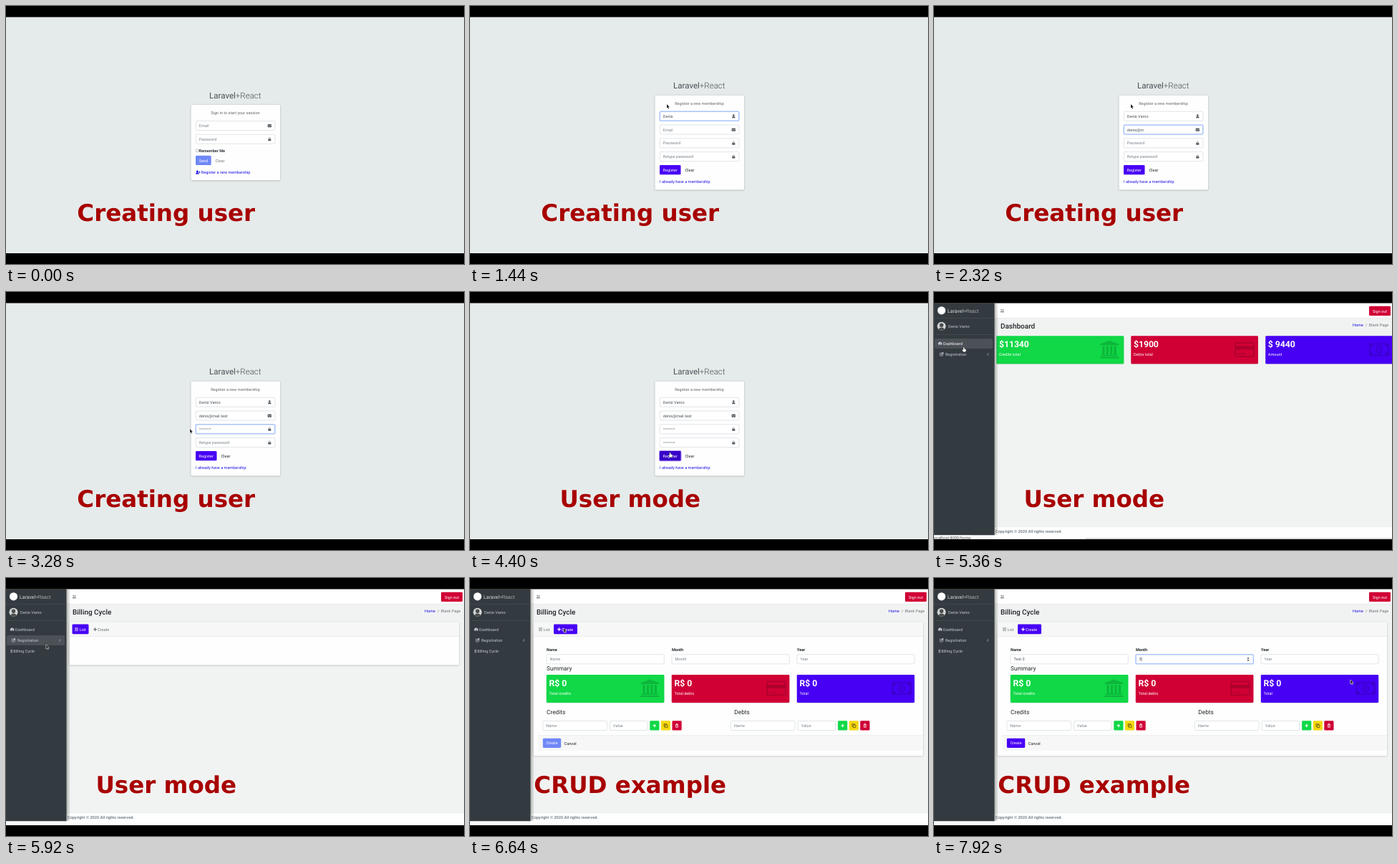
An HTML page with a canvas for the animation above (8 s loop, 640 by 360 pixels).

```html
<!DOCTYPE html>
<html lang="en">
<head>
<meta charset="utf-8">
<title>Laravel+React</title>
<style>
  html, body { margin: 0; width: 100%; height: 100%; overflow: hidden; background: #000; }
  canvas { display: block; width: 640px; height: 360px; }
</style>
</head>
<body>
<canvas id="stage"></canvas>
<script>
const LOOP = 8000, STEP = 80, REM = 5.55;
const GREEN = '#10d846', RED = '#d00035', BLUE = '#4700f4', YELLOW = '#f5d810';
const LINK = '#1a0ee6', DARK = '#212529', GREY = '#6c757d', BORDER = '#ced4da';
const FADED = 'rgba(0,0,0,.16)', MENU = '#c2c7d0', DISABLED = '#6f88f8';
const FULL_NAME = 'Denis Varno', EMAIL = 'denis@mail.test', DOTS = '•'.repeat(9);

const canvas = document.getElementById('stage');
const ctx = canvas.getContext('2d');
const dpr = window.devicePixelRatio || 1;
canvas.width = 640 * dpr;
canvas.height = 360 * dpr;

// time, x, y, hand shape from here on
const PATH = [
  [80, 300, 264, 0], [400, 290, 231, 1], [640, 290, 231, 0], [800, 275, 152, 0],
  [880, 275, 152, 0], [1040, 275, 137, 0], [3040, 275, 137, 0], [3200, 246, 172, 0],
  [3280, 257, 191, 0], [3360, 257, 191, 0], [3520, 285, 208, 0], [4000, 285, 208, 0],
  [4240, 279, 224, 1], [4640, 279, 224, 0], [5280, 41, 77, 1], [5440, 41, 77, 1],
  [5520, 40, 86, 1], [5680, 30, 101, 1], [5840, 30, 101, 0], [6080, 131, 70, 1],
  [6640, 131, 70, 0], [6960, 160, 112, 0], [7120, 160, 112, 0], [7360, 582, 142, 0]
];

function rect(x, y, w, h, fill, r = 0) {
  ctx.fillStyle = fill;
  ctx.beginPath();
  ctx.roundRect(x, y, w, h, r);
  ctx.fill();
}

function frame(x, y, w, h, color, r = 1.2, line = 0.6) {
  ctx.strokeStyle = color;
  ctx.lineWidth = line;
  ctx.beginPath();
  ctx.roundRect(x, y, w, h, r);
  ctx.stroke();
}

function disc(x, y, r, fill) {
  ctx.fillStyle = fill;
  ctx.beginPath();
  ctx.arc(x, y, r, 0, 7);
  ctx.fill();
}

function poly(points, fill) {
  ctx.fillStyle = fill;
  ctx.beginPath();
  points.forEach(([x, y]) => ctx.lineTo(x, y));
  ctx.closePath();
  ctx.fill();
}

function line(points, color, width) {
  ctx.strokeStyle = color;
  ctx.lineWidth = width;
  ctx.beginPath();
  points.forEach(([x, y]) => ctx.lineTo(x, y));
  ctx.stroke();
}

function text(s, x, y, color = DARK, size = REM, weight = 400, align = 'left') {
  ctx.font = `${weight} ${size}px Roboto, sans-serif`;
  ctx.textAlign = align;
  ctx.fillStyle = color;
  ctx.fillText(s, x, y);
  return x + ctx.measureText(s).width;
}

function panel(x, y, w, h, r = 1.4) {
  ctx.save();
  ctx.shadowColor = 'rgba(0,0,0,.28)';
  ctx.shadowBlur = 2.4 * dpr;
  ctx.shadowOffsetY = 0.4 * dpr;
  rect(x, y, w, h, '#fdfefd', r);
  ctx.restore();
}

function button(label, x, y, w, fill) {
  rect(x, y, w, 13.3, fill, 1.4);
  text(label, x + w / 2, y + 8.7, '#fff', REM, 400, 'center');
}

function field(x, y, w, value, hint, focus, icon) {
  rect(x, y, w, 13, '#fff', 1.4);
  if (focus) frame(x, y, w, 13, 'rgba(90,140,255,.3)', 1.4, 1.6);
  frame(x, y, w, 13, focus ? '#7fa6f5' : BORDER);
  text(value || hint, x + 4.5, y + 8.6, value ? '#495057' : '#7b838a');
  if (icon) icon(x + w - 7.5, y + 6.5);
}

const typed = (s, t, start, pace) =>
  t < start ? '' : s.slice(0, Math.floor((t - start) / pace) + 1);

// Icons, centred on x, y
function userIcon(x, y, color = '#555b60') {
  disc(x, y - 1.1, 1.4, color);
  ctx.beginPath();
  ctx.ellipse(x, y + 2.5, 2.4, 2.2, 0, Math.PI, 0);
  ctx.fill();
}

function mailIcon(x, y) {
  rect(x - 2.7, y - 2, 5.4, 4.2, '#555b60', 0.6);
  line([[x - 2.6, y - 0.9], [x, y + 0.8], [x + 2.6, y - 0.9]], '#fff', 0.5);
}

function lockIcon(x, y) {
  rect(x - 2, y - 0.3, 4, 2.8, '#555b60', 0.4);
  ctx.strokeStyle = '#555b60';
  ctx.lineWidth = 0.7;
  ctx.beginPath();
  ctx.arc(x, y - 0.6, 1.3, Math.PI, 0);
  ctx.stroke();
}

function barsIcon(x, y, color) {
  for (const d of [-1.7, 0, 1.7]) rect(x - 2.4, y + d - 0.4, 4.8, 0.8, color);
}

function plusIcon(x, y) {
  rect(x - 2.2, y - 0.6, 4.4, 1.2, '#fff');
  rect(x - 0.6, y - 2.2, 1.2, 4.4, '#fff');
}

function copyIcon(x, y) {
  frame(x - 2.4, y - 2.4, 3.6, 3.6, '#3b3a10', 0.4, 0.7);
  rect(x - 1, y - 1, 3.6, 3.6, YELLOW);
  frame(x - 1, y - 1, 3.6, 3.6, '#3b3a10', 0.4, 0.7);
}

function trashIcon(x, y) {
  rect(x - 2, y - 2.3, 4, 0.7, '#fff');
  rect(x - 0.7, y - 2.8, 1.4, 0.7, '#fff');
  frame(x - 1.5, y - 1.2, 3, 3.6, '#fff', 0.3, 0.7);
  line([[x, y - 0.8], [x, y + 2]], '#fff', 0.5);
}

function bankIcon(x, y) {
  poly([[x - 13, y - 7.5], [x, y - 12.5], [x + 13, y - 7.5], [x + 13, y - 6], [x - 13, y - 6]], FADED);
  for (let i = 0; i < 4; i++) rect(x - 9.7 + i * 5.4, y - 4.8, 3.2, 12, FADED);
  rect(x - 11, y + 7.4, 22, 1.6, FADED);
  rect(x - 13, y + 10, 26, 2.2, FADED);
}

function cardIcon(x, y) {
  frame(x - 13, y - 9.5, 26, 19, FADED, 2, 1.8);
  rect(x - 12, y - 5, 24, 5, FADED);
  rect(x - 10, y + 5, 4, 1.6, FADED);
  rect(x - 5, y + 5, 5.5, 1.6, FADED);
}

function billIcon(x, y) {
  frame(x - 13, y - 8, 26, 16, FADED, 1, 1.8);
  ctx.beginPath();
  ctx.ellipse(x, y, 4, 5, 0, 0, 7);
  ctx.stroke();
  rect(x - 0.8, y - 2.8, 1.6, 5.6, FADED);
  for (const [dx, dy] of [[-10.5, -5.5], [10.5, -5.5], [-10.5, 5.5], [10.5, 5.5]])
    disc(x + dx, y + dy, 1.9, FADED);
}

function brand(y) {
  const x = text('Laravel', 284, y, '#495057', 11.55);
  text('+React', x, y, '#495057', 11.55, 300);
}

function drawLogin() {
  brand(128.6);
  panel(258.5, 138, 124.5, 105);
  text('Sign in to start your session', 320.5, 151.2, '#666', REM, 400, 'center');
  field(265.3, 160.5, 110.5, '', 'Email', false, mailIcon);
  field(265.3, 179.2, 110.5, '', 'Password', false, lockIcon);
  frame(265.6, 200, 3.4, 3.6, '#888', 0.5, 0.5);
  text('Remember Me', 269.5, 204, '#33383d', REM, 700);
  button('Send', 265, 208.8, 21.7, DISABLED);
  text('Clear', 292.6, 217.5, '#777');
  userIcon(267.4, 232, LINK);
  rect(269.2, 231.5, 2.4, 0.7, LINK);
  rect(270.1, 230.6, 0.7, 2.4, LINK);
  text('Register a new membership', 272.8, 234, LINK);
}

function drawRegister(t) {
  const focus = t < 880 ? -1 : t < 2000 ? 0 : t < 2720 ? 1 : t < 3520 ? 2 : t < 4400 ? 3 : -1;
  const rows = [
    [typed(FULL_NAME, t, 1120, 80), 'Full name', userIcon],
    [typed(EMAIL, t, 2080, 40), 'Email', mailIcon],
    [typed(DOTS, t, 2720, 20), 'Password', lockIcon],
    [typed(DOTS, t, 3600, 30), 'Retype password', lockIcon]
  ];
  brand(115.3);
  panel(258.5, 124.7, 124.5, 131.8);
  text('Register a new membership', 320.5, 137.9, '#666', REM, 400, 'center');
  rows.forEach(([value, hint, icon], i) =>
    field(265.3, 147.2 + i * 18.8, 110.5, value, hint, focus === i, icon));
  if (t >= 4400) rect(264, 221, 31.5, 15.3, 'rgba(71,0,244,.45)', 2);
  button('Register', 265, 222, 29.5, t >= 4240 ? '#3700c8' : BLUE);
  text('Clear', 300.5, 230.8);
  text('I already have a membership', 265, 247.2, LINK);
}

function drawSidebar(t, cursor) {
  const shade = ctx.createLinearGradient(84, 0, 90, 0);
  shade.addColorStop(0, 'rgba(0,0,0,.3)');
  shade.addColorStop(1, 'rgba(0,0,0,0)');
  rect(84, 16, 6, 323, shade);
  rect(0, 339, 84.5, 6, '#fafbfa');
  rect(0, 15.5, 84.5, 323.8, '#343b40');

  disc(10.5, 25.8, 5.6, '#fff');
  const x = text('Laravel', 19, 28.5, '#d8dbde', 6.95);
  text('+React', x, 28.5, '#d8dbde', 6.95, 300);
  rect(0, 36, 84.5, 0.6, '#4f575e');

  ctx.save();
  ctx.beginPath();
  ctx.arc(10.5, 47.8, 6, 0, 7);
  ctx.clip();
  rect(4, 41, 13, 14, '#d4d6d5');
  disc(10.5, 46.2, 2.7, '#4a4d4e');
  disc(10.5, 54.5, 5, '#4a4d4e');
  ctx.restore();
  text(FULL_NAME, 20, 49.8, MENU);
  rect(3, 59.2, 79, 0.6, '#4f575e');

  const row = cursor[0] < 84 ? Math.floor((cursor[1] - 64.5) / 15) : -1;
  if (row >= 0 && row < 3) rect(1, 65 + row * 15, 81, 14, '#4b5156', 1.5);

  ctx.fillStyle = MENU;
  ctx.beginPath();
  ctx.arc(8.7, 72.4, 2.8, 2.7, 0.45);
  ctx.fill();
  line([[8.6, 73], [9.8, 70.7]], '#343b40', 0.5);
  text('Dashboard', 13, 74.2, row === 0 ? '#fff' : MENU);

  frame(8.3, 85, 4, 4, MENU, 0.6, 0.7);
  line([[10, 87.4], [13.3, 84.3]], MENU, 1.2);
  text('Registration', 15.7, 89, MENU);
  line([[76, 85.3], [74.5, 87], [76, 88.7]], MENU, 0.7);

  if (t >= 5520) {
    text('$', 6, 104, MENU, REM, 700);
    text('Billing Cycle', 10.2, 104, MENU);
  }
}

function drawShell(title) {
  rect(0, 15.5, 640, 329.5, '#f1f3f2');
  rect(84, 15.5, 556, 20.7, '#fff');
  rect(84, 36.2, 556, 0.6, '#dee2e6');
  barsIcon(95.4, 26.3, '#70757a');
  button('Sign out', 608, 19.8, 30, RED);
  text(title, 93, 51, DARK, 9.95, 500);
  text('Home', 585, 48.3, LINK);
  text('/', 603, 48.3, GREY);
  text('Blank Page', 635.3, 48.3, GREY, REM, 400, 'right');
  rect(84, 327.8, 556, 17.2, '#fdfefd');
  rect(84, 327.5, 556, 0.6, '#dee2e6');
  text('Copyright © 2020 All rights reserved.', 86, 336, '#7c858d', REM, 700);
}

function valueBox(x, y, w, fill, amount, label, icon, iconX) {
  rect(x, y + 0.6, w, 39, 'rgba(0,0,0,.15)', 1.4);
  rect(x, y, w, 39, fill, 1.4);
  icon(iconX, y + 19);
  text(amount, x + 3.6, y + 15.6, '#fff', 12.2, 700);
  text(label, x + 3.6, y + 28, '#fff');
}

function drawDashboard(cursor) {
  drawShell('Dashboard');
  valueBox(87.3, 61.3, 178, GREEN, '$11340', 'Credits total', bankIcon, 245);
  valueBox(275.3, 61.3, 177.6, RED, '$1900', 'Debts total', cardIcon, 434);
  valueBox(463.2, 61.3, 180, BLUE, '$ 9440', 'Amount', billIcon, 622);
}

function drawTabs(form) {
  rect(88.5, 61.5, 544.5, 20, '#f6f7f6', 1.4);
  rect(88.5, 81.2, 544.5, 0.6, '#dfe2e3');
  if (form) rect(117, 64.6, 33, 13.6, BLUE, 1.4);
  else rect(92.5, 64.6, 23, 13.6, BLUE, 1.4);
  const [list, create] = form ? [GREY, '#fff'] : ['#fff', GREY];
  barsIcon(98.5, 71.6, list);
  text('List', 102.6, 73.6, list);
  rect(122.2, 71, 4.6, 1.2, create);
  rect(123.9, 69.3, 1.2, 4.6, create);
  text('Create', 128, 73.6, create);
}

function entryRow(x, title, titleX) {
  text(title, titleX, 190.4, DARK, 8.3);
  field(x, 199.5, 89.5, '', 'Name');
  field(x + 93.7, 199.5, 52.3, '', 'Value');
  [[GREEN, plusIcon], [YELLOW, copyIcon], [RED, trashIcon]].forEach(([fill, icon], i) => {
    const bx = x + 149.5 + i * 15.6;
    rect(bx, 199.3, 13.2, 13.3, fill, 1.4);
    icon(bx + 6.6, 206);
  });
}

function drawForm(t) {
  const name = typed('Test 3', t, 7360, 30);
  const month = t >= 7840 ? '3' : '';
  const onName = t >= 7040 && t < 7680, onMonth = t >= 7680;
  text('Name', 107, 101.6, DARK, REM, 700);
  text('Month', 282, 101.6, DARK, REM, 700);
  text('Year', 457, 101.6, DARK, REM, 700);
  field(107, 106.8, 164.3, name, 'Name', onName);
  field(282, 106.8, 164.3, month, 'Month', onMonth);
  field(457, 106.8, 164, '', 'Year');
  if (onMonth) {
    rect(month ? 289.8 : 286.2, 110.6, 0.5, 5.6, '#333');
    poly([[437.4, 112.5], [439, 110.5], [440.6, 112.5]], '#444');
    poly([[437.4, 114], [439, 116], [440.6, 114]], '#444');
  }
  text('Summary', 107, 129.2, DARK, 8.3);
  valueBox(106.8, 134.9, 164.6, GREEN, 'R$ 0', 'Total credits', bankIcon, 251.3);
  valueBox(281.8, 134.9, 164.6, RED, 'R$ 0', 'Total debts', cardIcon, 428);
  valueBox(456.8, 134.9, 164.4, BLUE, 'R$ 0', 'Total', billIcon, 603);
  entryRow(101.8, 'Credits', 107);
  entryRow(364.6, 'Debts', 369.3);
  rect(95.5, 219.6, 537.5, 21.4, '#f6f7f6');
  rect(95.5, 219.4, 537.5, 0.6, '#e4e6e6');
  button('Create', 101.8, 223.7, 25.4, name ? BLUE : DISABLED);
  text('Cancel', 131.8, 232.5);
}

function drawStatus() {
  rect(212, 343.2, 428, 1.8, '#d3d5d5');
  rect(0, 339.4, 52, 5.6, '#fafafa');
  text('localhost:8000/home', -1.5, 345.2, '#555');
}

function cursorAt(t) {
  const i = PATH.findLastIndex(k => k[0] <= t);
  if (i < 0) return null;
  const a = PATH[i], b = PATH[i + 1];
  if (!b) return [a[1], a[2], a[3]];
  const p = (t - a[0]) / (b[0] - a[0]), e = p * p * (3 - 2 * p);
  return [a[1] + (b[1] - a[1]) * e, a[2] + (b[2] - a[2]) * e, a[3]];
}

function drawCursor([x, y, hand]) {
  ctx.save();
  ctx.translate(x, y);
  ctx.lineJoin = 'round';
  const shape = hand
    ? [[0, 0], [1, 0], [1.2, 2.3], [3.6, 3], [3.8, 4.4], [3, 6.6], [0, 6.6], [-1.7, 4], [-1.2, 3.3], [0, 4]]
    : [[0, 0], [0, 5.6], [1.3, 4.5], [2.1, 6.6], [3.1, 6.1], [2.2, 4.1], [3.9, 4]];
  const fill = hand ? '#fff' : '#2b2b2b', edge = hand ? '#222' : '#fff';
  line([...shape, shape[0]], edge, hand ? 0.8 : 1);
  poly(shape, fill);
  ctx.restore();
}

function draw(t) {
  const cursor = cursorAt(t);
  ctx.setTransform(dpr, 0, 0, dpr, 0, 0);
  ctx.textRendering = 'geometricPrecision';
  rect(0, 0, 640, 360, '#000');
  ctx.save();
  ctx.beginPath();
  ctx.rect(0, 15.5, 640, 329.5);
  ctx.clip();
  if (t < 4640) {
    rect(0, 15, 640, 331, '#e5ebea');
    if (t < 640) drawLogin();
    else drawRegister(t);
  } else {
    if (t < 5680) {
      drawDashboard();
    } else {
      const form = t >= 6400;
      drawShell('Billing Cycle');
      panel(88.5, 61.5, 544.5, form ? 186.7 : 60);
      drawTabs(form);
      if (form) drawForm(t);
    }
    drawSidebar(t, cursor);
    if (t >= 5280 && t < 5520) drawStatus();
  }
  if (cursor) drawCursor(cursor);
  ctx.restore();

  const caption = t < 4000 ? 'Creating user' : t < 6240 ? 'User mode' : 'CRUD example';
  ctx.font = 'bold 32.5px "DejaVu Sans", sans-serif';
  ctx.textAlign = 'center';
  ctx.fillStyle = '#a80000';
  ctx.fillText(caption, 223.7, 300);
}

function tick() {
  const t = performance.now() % LOOP;
  draw(Math.floor(t / STEP) * STEP);
  requestAnimationFrame(tick);
}
tick();
</script>
</body>
</html>
```
